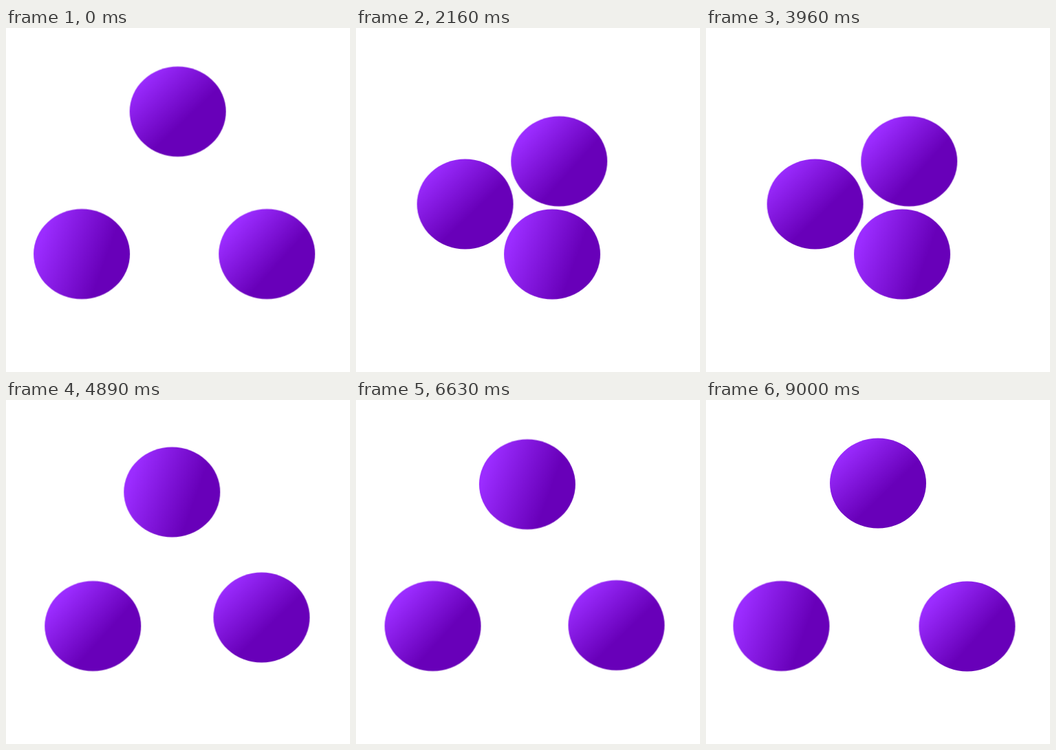
An HTML page without scripts that plays this animation: 500x500 px, repeating every 9.03 s.

```html
<!DOCTYPE html>
<html lang="en">
<head>
<meta charset="utf-8">
<title>Three balls</title>
<style>
  html, body { margin: 0; width: 100%; height: 100%; overflow: hidden; background: #fff; }
  svg { display: block; width: 100%; height: 100%; }

  /* corners of the triangle */
  svg {
    --top: translate(250px, 121px);
    --left: translate(109.5px, 328.5px);
    --right: translate(379.5px, 329px);
  }
  .a { --p: var(--top); --q: var(--left); --r: var(--right); fill: url(#ga); }
  .b { --p: var(--left); --q: var(--right); --r: var(--top); fill: url(#gb); }
  .c { --p: var(--right); --q: var(--top); --r: var(--left); fill: url(#gc); }

  ellipse {
    transform: var(--p);
    animation: lap 9.03s cubic-bezier(.3333, 0, .6667, 1) infinite;
  }

  /* five laps of 1.8 s, 0.6 s per side, then a 30 ms hold */
  @keyframes lap {
    0%, 19.9336%, 39.8671%, 59.8007%, 79.7342%, 99.6678%, 100% { transform: var(--p); }
    6.6445%, 26.5781%, 46.5116%, 66.4452%, 86.3787% { transform: var(--q); }
    13.2890%, 33.2226%, 53.1561%, 73.0897%, 93.0233% { transform: var(--r); }
  }
</style>
</head>
<body>
<svg viewBox="0 0 500 500">
  <defs>
    <linearGradient id="shade">
      <stop offset="0" stop-color="#9b2cff"/>
      <stop offset="1" stop-color="#6800b9"/>
    </linearGradient>
    <linearGradient id="ga" href="#shade" gradientUnits="userSpaceOnUse" x1="-48" y1="-49" x2="11" y2="13"/>
    <linearGradient id="gb" href="#shade" gradientUnits="userSpaceOnUse" x1="-58" y1="-22" x2="34" y2="11"/>
    <linearGradient id="gc" href="#shade" gradientUnits="userSpaceOnUse" x1="-46" y1="-41" x2="16" y2="15"/>
  </defs>
  <ellipse class="a" rx="70" ry="65.5"/>
  <ellipse class="c" rx="70" ry="65.5"/>
  <ellipse class="b" rx="70" ry="65.5"/>
</svg>
</body>
</html>
```
